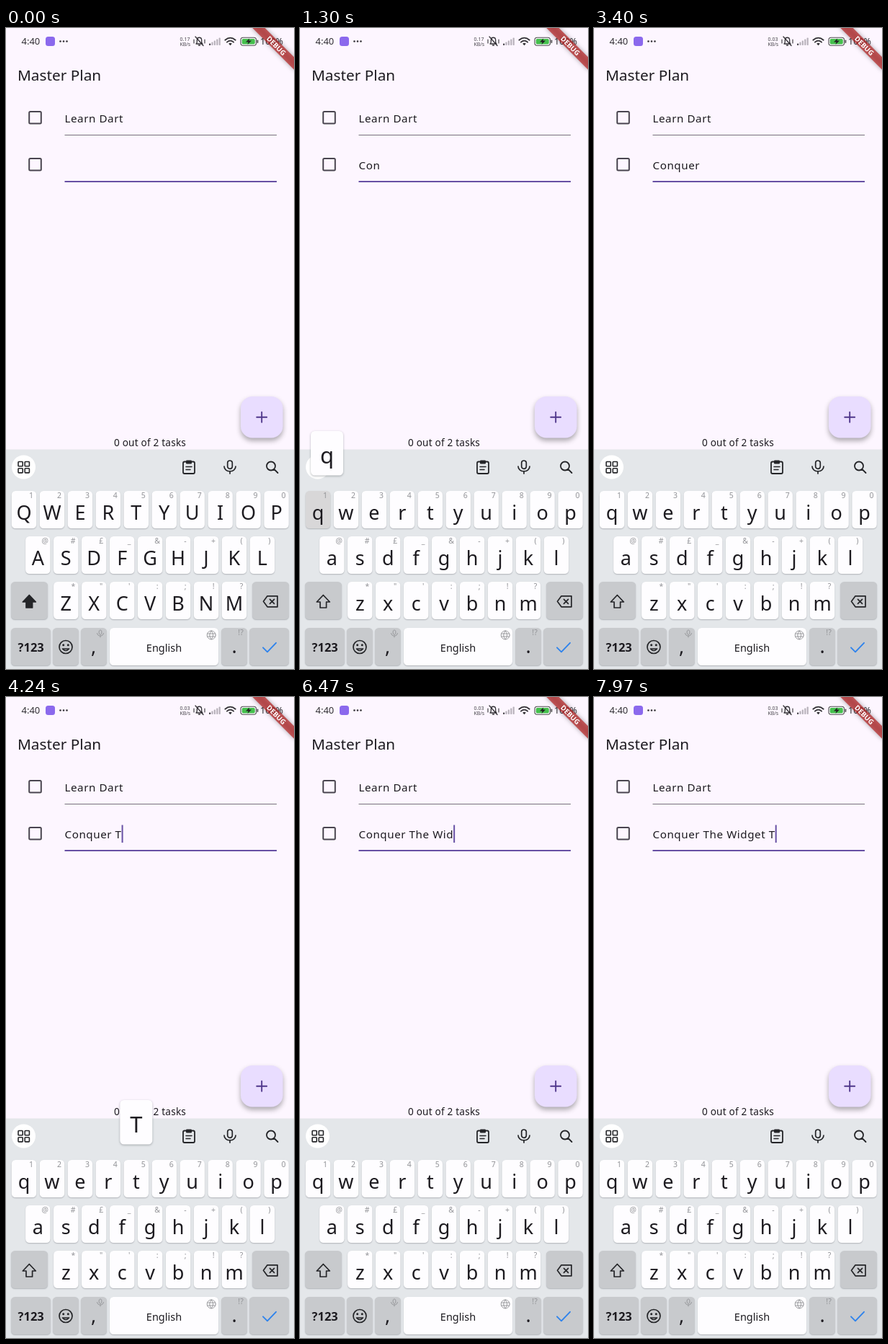
Write an HTML page with a canvas that moves like this. It is 400x889 px and loops after 8000 ms.

```html
<!DOCTYPE html>
<html lang="en">
<head>
<meta charset="utf-8">
<title>Task list typing</title>
<style>
  html, body { margin: 0; width: 100%; height: 100%; overflow: hidden; background: #fdf6ff; }
  canvas { display: block; width: 400px; height: 889px; }
</style>
</head>
<body>
<canvas id="stage"></canvas>
<script>
const W = 400, H = 889, LOOP = 8000, BLINK = 500, POPUP_TAIL = 80;
const FONT = '"Noto Sans", "Open Sans", sans-serif';
const INK = '#1d1b20', ICON = '#242528', PURPLE = '#6750a4', HINT = '#929397';
const canvas = document.getElementById('stage');
const ctx = canvas.getContext('2d');
const dpr = window.devicePixelRatio || 1;
canvas.width = W * dpr;
canvas.height = H * dpr;

// Key, time pressed, time released
const strokes = [
  ['C', 40, 110], ['o', 310, 390], ['n', 600, 690], ['q', 1280, 1375],
  ['u', 1480, 1560], ['e', 1770, 1850], ['r', 2080, 2180], [' ', 2600, 2700],
  ['shift', 3670, 3750], ['T', 4060, 4180], ['h', 4350, 4440], ['e', 4640, 4730],
  [' ', 4860, 4945], ['shift', 5800, 5880], ['W', 6010, 6090], ['i', 6150, 6230],
  ['d', 6310, 6385], ['g', 6540, 6640], ['e', 6780, 6880], ['t', 7030, 7120],
  [' ', 7370, 7460], ['shift', 7560, 7630], ['T', 7740, 7850]
].map(([key, down, up]) => ({ key, down, up }));

const rows = [
  { keys: 'qwertyuiop', hints: '1234567890', x: 25, y: 642 },
  { keys: 'asdfghjkl', hints: '@#£_&-+()', x: 44.3, y: 705 },
  { keys: 'zxcvbnm', hints: '*"\':;!?', x: 83.3, y: 768 }
];
const PITCH = 38.95;

function stateAt(t) {
  const s = { text: '', upper: true, pressed: '', popup: null, typedAt: -600 };
  for (const { key, down, up } of strokes) {
    if (t < down) break;
    if (t < up) s.pressed = key.toLowerCase();
    if (key.length === 1 && key !== ' ' && t < up + POPUP_TAIL) s.popup = key;
    if (t < up) continue;
    s.upper = key === 'shift';
    if (key !== 'shift') {
      s.text += key;
      s.typedAt = up;
    }
  }
  s.cursor = Math.floor((t - s.typedAt) / BLINK) % 2 === 0;
  return s;
}

function label(str, x, y, size, { weight = 500, color = INK, align = 'left', spacing = 0 } = {}) {
  ctx.font = `${weight} ${size}px ${FONT}`;
  ctx.letterSpacing = spacing + 'px';
  ctx.textAlign = align;
  ctx.fillStyle = color;
  ctx.fillText(str, x, y);
  return ctx.measureText(str).width;
}

function centered(str, x, y, size, color = INK, weight = 500) {
  label(str, x, y, size, { color, weight, align: 'center' });
}

function box(x, y, w, h, r, fill) {
  ctx.beginPath();
  ctx.roundRect(x, y, w, h, r);
  ctx.fillStyle = fill;
  ctx.fill();
}

function frame(x, y, w, h, r, color, width) {
  ctx.beginPath();
  ctx.roundRect(x, y, w, h, r);
  ctx.strokeStyle = color;
  ctx.lineWidth = width;
  ctx.stroke();
}

function withShadow(color, blur, dy, draw) {
  ctx.save();
  ctx.shadowColor = color;
  ctx.shadowBlur = blur * dpr;
  ctx.shadowOffsetY = dy * dpr;
  draw();
  ctx.restore();
}

function path(d, x, y, color, width, fill) {
  ctx.save();
  ctx.translate(x, y);
  ctx.lineCap = ctx.lineJoin = 'round';
  const p = new Path2D(d);
  if (fill) {
    ctx.fillStyle = fill;
    ctx.fill(p);
  }
  if (width) {
    ctx.strokeStyle = color;
    ctx.lineWidth = width;
    ctx.stroke(p);
  }
  ctx.restore();
}

function circle(x, y, r, fill) {
  ctx.beginPath();
  ctx.arc(x, y, r, 0, Math.PI * 2);
  ctx.fillStyle = fill;
  ctx.fill();
}

function drawStatus(t) {
  label('4:40', 21.5, 23.3, 13, { color: '#333136' });
  box(55, 12, 13, 13, 3.5, '#8b69ed');
  for (const x of [75.5, 80, 84.5]) circle(x, 18.5, 1.3, '#333136');
  centered(t < 3000 ? '0.17' : '0.03', 248.5, 17.5, 7, '#4a474d');
  centered('KB/s', 248.8, 24.8, 7, '#4a474d');

  path('M-4.5 4H4.5L3.2 2V-1C3.2-6-3.2-6-3.2-1V2ZM-1 6H1M-5.5-6L5.5 6.5', 268.5, 18, '#333136', 1.3);
  path('M-7.5-2V3M7.5-2V3', 268.5, 18, '#333136', 1.1);

  for (let i = 0; i < 5; i++) {
    const h = 2.5 + i * 2;
    box(282 + i * 3.4, 24 - h, 2.2, h, 0.8, i < 1 ? '#454248' : '#b9b3bc');
  }

  path('M-7.2-1.8Q0-8 7.2-1.8M-4.6 1.2Q0-2.9 4.6 1.2', 311.5, 18.5, '#333136', 1.8);
  path('M-2.3 3.2Q0 1.4 2.3 3.2L0 5.8Z', 311.5, 18.5, '', 0, '#333136');

  frame(326, 13.2, 21.5, 11, 3.2, '#4b4b4b', 1.1);
  box(327.7, 14.9, 18.1, 7.6, 1.8, '#45c04d');
  box(348.6, 16.5, 1.7, 4.5, 0.8, '#4b4b4b');
  path('M1-4L-4 1H-.5L-1.5 4.5L4-1H.5Z', 337, 18.5, '', 0, '#222');
  label('100%', 353, 23.3, 12.5, { color: '#333136' });
}

function drawBanner() {
  ctx.save();
  ctx.translate(W, 0);
  ctx.rotate(Math.PI / 4);
  withShadow('rgba(0,0,0,.5)', 6, 0, () => box(-42, 28.5, 84, 12.3, 0, 'rgba(183,28,28,.68)'));
  centered('DEBUG', 0, 38.3, 9.6, '#fff', 800);
  ctx.restore();
}

function drawTask(y, text, focused, cursor) {
  frame(32.2, y - 9, 16.6, 16.6, 1.5, '#49454f', 2);
  const width = label(text, 81.5, y + 6.3, 15.2, { spacing: 0.55 });
  if (focused) {
    box(81.5, y + 22, 294.5, 2, 0, PURPLE);
    if (cursor) box(81.5 + width, y - 12.5, 2, 24.5, 0, PURPLE);
  } else {
    box(81.5, y + 23, 294.5, 1, 0, '#77727c');
  }
}

function drawFab() {
  withShadow('rgba(0,0,0,.32)', 7, 4, () => box(326, 511, 58.5, 57.5, 16.3, '#e9ddff'));
  path('M-7 0H7M0-7V7', 355.2, 539.8, '#4f378b', 1.9);
}

function drawKey(x, y, w, fill) {
  withShadow('rgba(70,75,85,.32)', 1.5, 1, () => box(x, y, w, 52, 5.5, fill));
}

function drawMic(x, y, k, color) {
  ctx.save();
  ctx.translate(x, y);
  ctx.scale(k, k);
  path('M-3.3-6C-3.3-10 3.3-10 3.3-6V-1C3.3 3.4-3.3 3.4-3.3-1ZM-8-1C-8 8 8 8 8-1M0 6V9', 0, 0, color, 1.7);
  ctx.restore();
}

function drawToolbar() {
  circle(24.5, 609, 16.5, '#fff');
  for (const x of [17, 26.2]) for (const y of [601.5, 610.7]) frame(x, y, 6.2, 6.2, 0.8, ICON, 1.6);
  frame(246, 601.5, 16, 16.5, 2, ICON, 1.8);
  box(250, 599.5, 8, 5, 1.3, ICON);
  path('M-4-1H4M-4 3H2', 254, 609.5, ICON, 1.5);
  drawMic(311, 609, 1, ICON);
  path('M5-1.5A6 6 0 1 1-7-1.5A6 6 0 1 1 5-1.5M3.5 3L8.5 8', 369, 609, ICON, 1.8);
}

function drawSpecialKeys({ upper, pressed }) {
  const gray = '#c8cacd';
  drawKey(7, 768, 51, pressed === 'shift' ? '#b4b6ba' : gray);
  drawKey(342, 768, 51, gray);
  for (const [x, w] of [[7, 55], [65, 36], [104, 36], [299, 36], [338, 55]]) drawKey(x, 832, w, gray);
  drawKey(144, 832, 151, pressed === ' ' ? '#dcdcde' : '#fefdff');

  path('M0-9L9 .5H4.3V8.5H-4.3V.5H-9Z', 32.3, 795.5, ICON, 1.7, upper ? ICON : '');
  path('M-10 0L-4.5-7.5H9.5V7.5H-4.5ZM-1-3L5 3M5-3L-1 3', 367.5, 795.3, ICON, 1.7);

  centered('?123', 34.7, 864.5, 16.5, INK, 600);
  path('M9 0A9 9 0 1 1-9 0A9 9 0 1 1 9 0M-4.5 2.5Q0 7.5 4.5 2.5Z', 83, 858.5, ICON, 1.7);
  circle(79.7, 855.7, 1.5, ICON);
  circle(86.3, 855.7, 1.5, ICON);
  centered(',', 121.7, 866.5, 27);
  drawMic(131, 840, 0.55, HINT);
  centered('English', 219.5, 865, 14.5);
  path('M6 0A6 6 0 1 1-6 0A6 6 0 1 1 6 0M-5.5-2H5.5M-5.5 2H5.5M0-6Q-5 0 0 6Q5 0 0-6', 285.2, 842, HINT, 0.9);
  centered('.', 317, 866.5, 27);
  centered('!?', 326, 841.5, 10.5, HINT);
  path('M-9 .5L-3 6.5L9-6', 366, 858.8, '#2f83ec', 1.9);
}

function drawKeyboard(s) {
  box(0, 584.5, W, H - 584.5, 0, '#e4e7ea');
  drawToolbar();
  const cased = c => s.upper ? c.toUpperCase() : c;
  for (const { keys, hints, x, y } of rows) {
    [...keys].forEach((c, i) => {
      const cx = x + i * PITCH;
      drawKey(cx - 17.2, y, 34.4, s.pressed === c ? '#d8d7d8' : '#fefdff');
      centered(cased(c), cx, y + 39.5, 27);
      centered(hints[i], cx + 10, y + 9.7, 10.5, HINT);
    });
  }
  drawSpecialKeys(s);
  if (s.popup) drawPopup(s.popup);
}

function drawPopup(c) {
  const row = rows.find(r => r.keys.includes(c.toLowerCase()));
  const keyX = row.x + row.keys.indexOf(c.toLowerCase()) * PITCH;
  const cx = Math.min(362.5, Math.max(37.5, keyX));
  const top = row.y - 83;
  withShadow('rgba(40,45,55,.35)', 3, 1, () => box(cx - 22.5, top, 45, 61.5, 5.5, '#fefdff'));
  centered(c, cx, top + 44.5, 31);
}

function draw(t) {
  const s = stateAt(t);
  ctx.setTransform(dpr, 0, 0, dpr, 0, 0);
  box(0, 0, W, H, 0, '#fdf6ff');
  drawStatus(t);
  label('Master Plan', 16, 72.5, 20.8);
  drawTask(125, 'Learn Dart', false);
  drawTask(190, s.text, true, s.cursor);
  label('0 out of 2 tasks', 200, 580.3, 13.6, { align: 'center', spacing: 0.2 });
  drawFab();
  drawKeyboard(s);
  drawBanner();
}

const start = performance.now();
function tick() {
  draw((performance.now() - start) % LOOP);
  requestAnimationFrame(tick);
}
tick();
</script>
</body>
</html>
```
